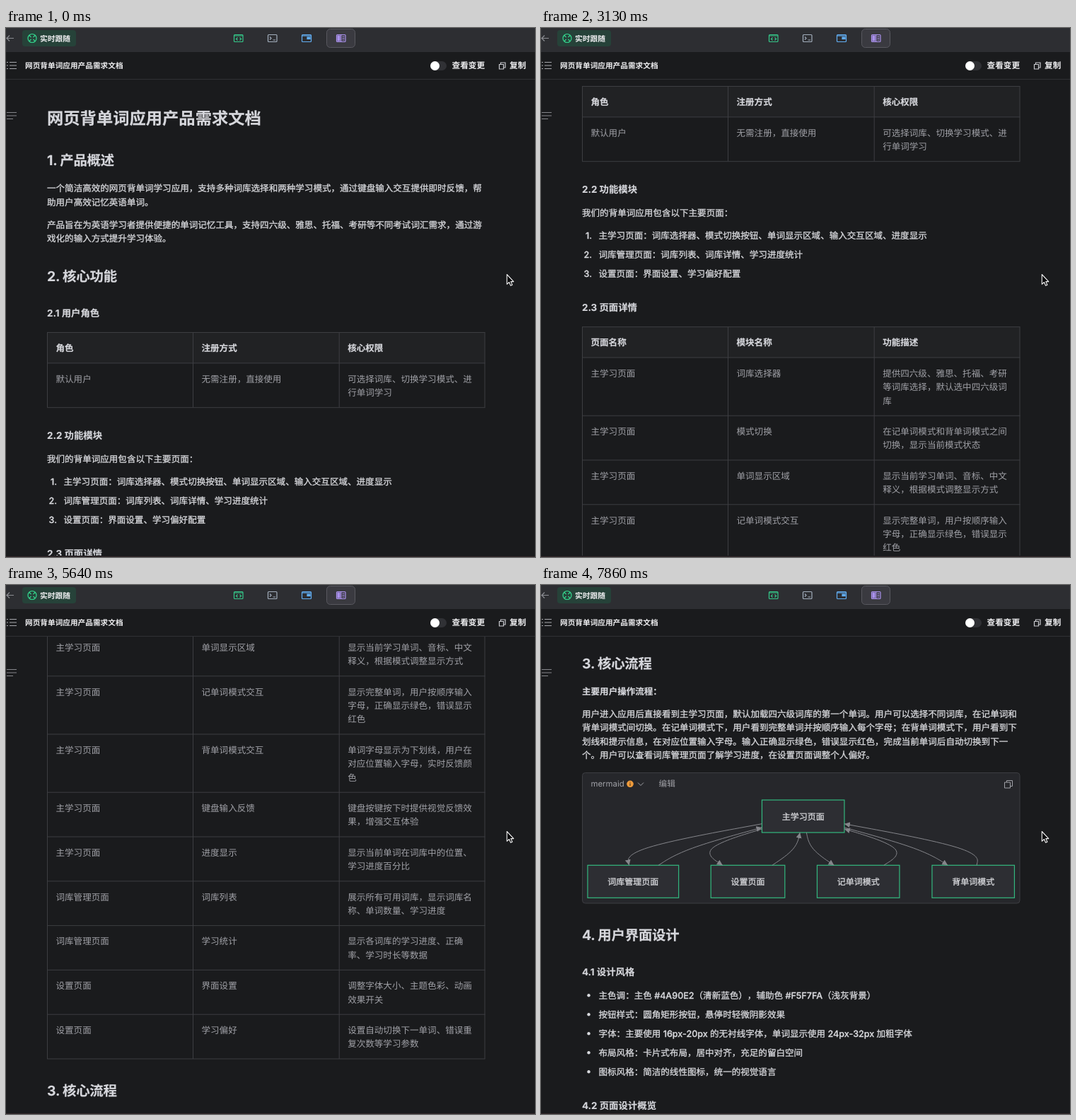
These frames come from a looping animation (748x748 px, 8 s). An HTML page:

```html
<!DOCTYPE html>
<html lang="zh-CN">
<head>
<meta charset="utf-8">
<style>
  html, body { margin: 0; width: 100%; height: 100%; overflow: hidden; background: #1a1b1d; }
  svg { display: block; width: 748px; height: 748px; }
  text {
    font-family: Inter, "Noto Sans CJK SC", "Noto Sans CJK", sans-serif;
    text-rendering: geometricPrecision; text-spacing-trim: space-all; white-space: pre;
  }
  .head { font-weight: 700; fill: #d6d7dc; stroke: #d6d7dc; stroke-width: .15px; }
  .h2 { letter-spacing: -.2px; }
  .body { font-weight: 500; fill: #d9dade; stroke: #d9dade; stroke-width: .3px; }
  .cell { fill: #a0a1a7; }
  .bar { font-weight: 600; fill: #eeeef0; }
  .dim { fill: #a0a1a7; }
  .line { fill: none; stroke-width: 1.2; }
</style>
</head>
<body>
<svg viewBox="0 0 748 748" xmlns="http://www.w3.org/2000/svg">
  <defs>
    <clipPath id="view"><rect y="73" width="748" height="673"/></clipPath>
    <marker id="tip" markerUnits="userSpaceOnUse" markerWidth="9" markerHeight="9" refX="8" refY="4" orient="auto">
      <path d="M0 0L8 4L0 8z" fill="#85868b"/>
    </marker>
  </defs>
  <rect width="748" height="748" fill="#1a1b1d"/>
  <g clip-path="url(#view)"><g id="doc"></g></g>

  <rect width="748" height="34" fill="#2d2e32"/>
  <path d="M0 72.5H748" stroke="#303135"/>
  <path d="M0 747.5H748" stroke="#33272a"/>

  <path class="line" stroke="#8b8c92" d="M11 14.5H1M5 10.5L1 14.5L5 18.5"/>
  <rect x="23" y="3" width="76" height="23" rx="4" fill="#264239"/>
  <g class="line" stroke="#35d990">
    <circle cx="37" cy="14.5" r="6"/>
    <path d="M33 10.500l2.600 2.600M41 10.500l-2.600 2.600M33 18.500l2.600-2.600M41 18.500l-2.600-2.600"/>
  </g>
  <g class="line" stroke="#35c98a">
    <rect x="322.500" y="9.500" width="12.500" height="10" rx="1"/>
    <path d="M322.500 11H335M327.500 13.500l-2 2 2 2M330.500 13.500l2 2-2 2"/>
  </g>
  <g class="line" stroke="#a3afbd">
    <rect x="370.500" y="9.500" width="12.500" height="10" rx="1"/>
    <path d="M373 12.500l2 2-2 2M377.500 17H381"/>
  </g>
  <g class="line" stroke="#62aef2">
    <rect x="418.500" y="9.500" width="13" height="10" rx="1"/>
    <path d="M418.500 11H431.500"/>
    <rect x="426" y="13" width="4" height="2.500" fill="#62aef2"/>
  </g>
  <rect x="453.500" y="1.500" width="40" height="26" rx="5" fill="#3a3a40" stroke="#58585f"/>
  <g class="line" stroke="#ab92ee">
    <rect x="467.500" y="9.500" width="12.500" height="10" rx="1"/>
    <path d="M473.700 9.500V19.500M475.500 12h3M475.500 14.500h3M475.500 17h3"/>
    <rect x="469" y="11" width="3" height="7" fill="#ab92ee"/>
  </g>

  <path class="line" stroke="#a6a7ac" d="M5 48.500H15M5 53H15M5 57.500H15M1 48.500H3M1 53H3M1 57.500H3"/>
  <rect x="600" y="47" width="23" height="13" rx="6.500" fill="#303135"/>
  <circle cx="606.500" cy="53.500" r="6.500" fill="#fff"/>
  <path class="line" stroke="#c9cacf" d="M699.500 51V49H706V56H704M697.500 51.500H703.500V58H697.500z"/>
  <path class="line" stroke="#85868b" d="M1 119.500H15M1 124H15M1 128.500H10"/>
  <g id="bar"></g>
  <path d="M708.300 348.500V362.300L711.400 359.400L713.600 364.300L715.900 363.300L713.800 358.600H717.800z" fill="#08080a" stroke="#f4f4f4" stroke-width="1.100" stroke-linejoin="round"/>
</svg>
<script>
const NS = 'http://www.w3.org/2000/svg';
const doc = document.getElementById('doc');
const bar = document.getElementById('bar');
const BASE = 12.56, LINE = 19.4, EDGE = '#3d3e42';
const COLS = [58.5, 264.5, 471.2], RIGHT = 677;

function add(parent, tag, attrs, content) {
  const el = document.createElementNS(NS, tag);
  for (const k in attrs) el.setAttribute(k, attrs[k]);
  if (content) el.textContent = content;
  parent.append(el);
}
// cy is the middle of a CJK glyph
const text = (parent, cls, x, cy, size, str, anchor = 'start') =>
  add(parent, 'text', { class: cls, x, y: cy + size * .35, 'font-size': size, 'text-anchor': anchor }, str);
const lines = (cls, x, cy, str) =>
  str.split('|').forEach((s, i) => text(doc, cls, x, cy + i * LINE, BASE, s));
const path = (d, stroke, extra) => add(doc, 'path', { d, stroke, fill: 'none', ...extra });
const h2 = (cy, str) => text(doc, 'head h2', 58, cy, 19.4, str);
const h3 = (cy, str) => text(doc, 'head', 58, cy, 13.4, str);

function table(top, rows) {
  let y = top;
  rows.forEach((row, r) => {
    const cells = row.split('/');
    const h = 24 + LINE * Math.max(...cells.map(c => c.split('|').length));
    if (!r) add(doc, 'rect', { x: COLS[0], y, width: RIGHT - COLS[0], height: h, fill: '#212224' });
    cells.forEach((c, i) => lines(r ? 'cell' : 'head', COLS[i] + 12, y + 22.4, c));
    path(`M58 ${y}H677.5`, EDGE);
    y += h;
  });
  path(`M58 ${y}H677.5`, EDGE);
  [...COLS, RIGHT].forEach(x => path(`M${x} ${top}V${y}`, EDGE));
}

function list(cy, items, ordered) {
  items.forEach((s, i) => {
    const y = cy + i * 27;
    if (ordered) text(doc, 'body', 72, y, BASE, i + 1 + '.', 'end');
    else add(doc, 'circle', { cx: 67.5, cy: y, r: 2.2, fill: '#d9dade' });
    text(doc, 'body', 81.5, y, BASE, s);
  });
}

const ROOT = { x: 370.7, y: 1824, w: 116.5 }, NODE_H = 46, CHILD_Y = 1916.3;
const MID_Y = (ROOT.y + CHILD_Y) / 2;

function node({ x, y, w }, label) {
  add(doc, 'rect', {
    x: x - w / 2, y: y - NODE_H / 2, width: w, height: NODE_H,
    fill: '#2d2e33', stroke: '#33b87f', 'stroke-width': 1.2,
  });
  text(doc, 'body', x, y + .3, 12, label, 'middle');
}

// Where the line from a node's centre to (px, py) leaves its box
function border({ x, y, w }, px, py) {
  const dx = px - x, dy = py - y;
  const k = Math.min(w / 2 / Math.abs(dx), NODE_H / 2 / Math.abs(dy));
  return [x + dx * k, y + dy * k];
}

// B-spline from one node to another by way of (midX, MID_Y)
function edge(from, to, midX) {
  const a = border(from, midX, MID_Y), b = [midX, MID_Y], c = border(to, midX, MID_Y);
  const mix = (i, j, k) => a.map((_, n) => (a[n] * i + b[n] * j + c[n] * k) / 6);
  path(`M${a}L${mix(5, 1, 0)}C${mix(4, 2, 0)} ${mix(2, 4, 0)} ${mix(1, 4, 1)}` +
       `C${mix(0, 4, 2)} ${mix(0, 2, 4)} ${mix(0, 1, 5)}L${c}`, '#85868b', { 'marker-end': 'url(#tip)' });
}

text(bar, 'bar', 48, 14.8, 10.76, '实时跟随');
text(bar, 'bar', 27, 53.3, 10.66, '网页背单词应用产品需求文档');
text(bar, 'bar', 630.5, 53.3, 11.66, '查看变更');
text(bar, 'bar', 712, 53.3, 11.66, '复制');

text(doc, 'head', 58, 128.3, 23.3, '网页背单词应用产品需求文档');
h2(187.5, '1. 产品概述');
lines('body', 58, 227, '一个简洁高效的网页背单词学习应用，支持多种词库选择和两种学习模式，通过键盘输入交互提供即时反馈，帮|助用户高效记忆英语单词。');
lines('body', 58, 278.2, '产品旨在为英语学习者提供便捷的单词记忆工具，支持四六级、雅思、托福、考研等不同考试词汇需求，通过游|戏化的输入方式提升学习体验。');
h2(351, '2. 核心功能');
h3(403.3, '2.1 用户角色');
table(430.5, [
  '角色/注册方式/核心权限',
  '默认用户/无需注册，直接使用/可选择词库、切换学习模式、进|行单词学习',
]);
h3(576.3, '2.2 功能模块');
lines('body', 58, 609.3, '我们的背单词应用包含以下主要页面：');
list(641.4, [
  '主学习页面：词库选择器、模式切换按钮、单词显示区域、输入交互区域、进度显示',
  '词库管理页面：词库列表、词库详情、学习进度统计',
  '设置页面：界面设置、学习偏好配置',
], true);
h3(743.3, '2.3 页面详情');
table(770.6, [
  '页面名称/模块名称/功能描述',
  '主学习页面/词库选择器/提供四六级、雅思、托福、考研|等词库选择，默认选中四六级词|库',
  '主学习页面/模式切换/在记单词模式和背单词模式之间|切换，显示当前模式状态',
  '主学习页面/单词显示区域/显示当前学习单词、音标、中文|释义，根据模式调整显示方式',
  '主学习页面/记单词模式交互/显示完整单词，用户按顺序输入|字母，正确显示绿色，错误显示|红色',
  '主学习页面/背单词模式交互/单词字母显示为下划线，用户在|对应位置输入字母，实时反馈颜|色',
  '主学习页面/键盘输入反馈/键盘按键按下时提供视觉反馈效|果，增强交互体验',
  '主学习页面/进度显示/显示当前单词在词库中的位置、|学习进度百分比',
  '词库管理页面/词库列表/展示所有可用词库，显示词库名|称、单词数量、学习进度',
  '词库管理页面/学习统计/显示各词库的学习进度、正确|率、学习时长等数据',
  '设置页面/界面设置/调整字体大小、主题色彩、动画|效果开关',
  '设置页面/学习偏好/设置自动切换下一单词、错误重|复次数等学习参数',
]);
h2(1608.3, '3. 核心流程');
text(doc, 'head', 58, 1647.4, BASE, '主要用户操作流程：');
lines('body', 58, 1679.5, '用户进入应用后直接看到主学习页面，默认加载四六级词库的第一个单词。用户可以选择不同词库，在记单词和|背单词模式间切换。在记单词模式下，用户看到完整单词并按顺序输入每个字母；在背单词模式下，用户看到下|划线和提示信息，在对应位置输入字母。输入正确显示绿色，错误显示红色，完成当前单词后自动切换到下一|个。用户可以查看词库管理页面了解学习进度，在设置页面调整个人偏好。');

add(doc, 'rect', { x: 58.5, y: 1762.5, width: 618.5, height: 184.5, rx: 4, fill: '#26272b', stroke: EDGE });
text(doc, 'dim', 70.5, 1778.2, 11.4, 'mermaid');
add(doc, 'circle', { cx: 126, cy: 1778.3, r: 4.8, fill: '#ee9b3c' });
path('M126 1775.500v.9M126 1777.500v3.500', '#4a3215', { 'stroke-width': 1.1 });
path('M137 1776.500l4 4 4-4', '#a0a1a7');
text(doc, 'dim', 166.5, 1778.2, 11.66, '编辑');
path('M658.500 1776V1773.500H666.500V1781.500H664M655.500 1776H663.500V1784H655.500z', '#a0a1a7');
node(ROOT, '主学习页面');
// label, centre, width, bend of the edge down, bend of the edge up
[
  ['词库管理页面', 130.3, 128.7, 119, 202],
  ['设置页面', 292.5, 104.6, 221, 361.5],
  ['记单词模式', 448.7, 116.5, 380, 521],
  ['背单词模式', 611.2, 116.5, 539, 621],
].forEach(([label, x, w, down, up]) => {
  const child = { x, y: CHILD_Y, w };
  node(child, label);
  edge(ROOT, child, down);
  edge(child, ROOT, up);
});

h2(1992, '4. 用户界面设计');
h3(2044.2, '4.1 设计风格');
list(2077.3, [
  '主色调：主色 #4A90E2（清新蓝色），辅助色 #F5F7FA（浅灰背景）',
  '按钮样式：圆角矩形按钮，悬停时轻微阴影效果',
  '字体：主要使用 16px-20px 的无衬线字体，单词显示使用 24px-32px 加粗字体',
  '布局风格：卡片式布局，居中对齐，充足的留白空间',
  '图标风格：简洁的线性图标，统一的视觉语言',
]);
h3(2233.5, '4.2 页面设计概览');

// [time in ms, scroll offset in px]
const LOOP = 8000;
const scroll = [
  [0, 0], [750, 3], [900, 8], [1040, 14], [1190, 20], [1490, 40], [1640, 62], [1940, 86],
  [2090, 126], [2240, 162], [2540, 205], [2690, 250], [2980, 302], [3130, 348],
  [3420, 392], [3570, 435], [4020, 452], [4160, 498], [4460, 535], [4610, 572],
  [4760, 609], [4910, 645], [5050, 705], [5200, 768], [5490, 832], [5640, 893],
  [5940, 960], [6090, 1025], [6380, 1094], [6530, 1159], [6680, 1213], [6820, 1265],
  [6970, 1315], [7120, 1362], [7410, 1408], [7560, 1452], [7860, 1497], [LOOP, 1497],
];
doc.animate(
  scroll.map(([t, y]) => ({ offset: t / LOOP, transform: `translateY(${-y}px)`, easing: 'step-end' })),
  { duration: LOOP, iterations: Infinity }
);
</script>
</body>
</html>
```
